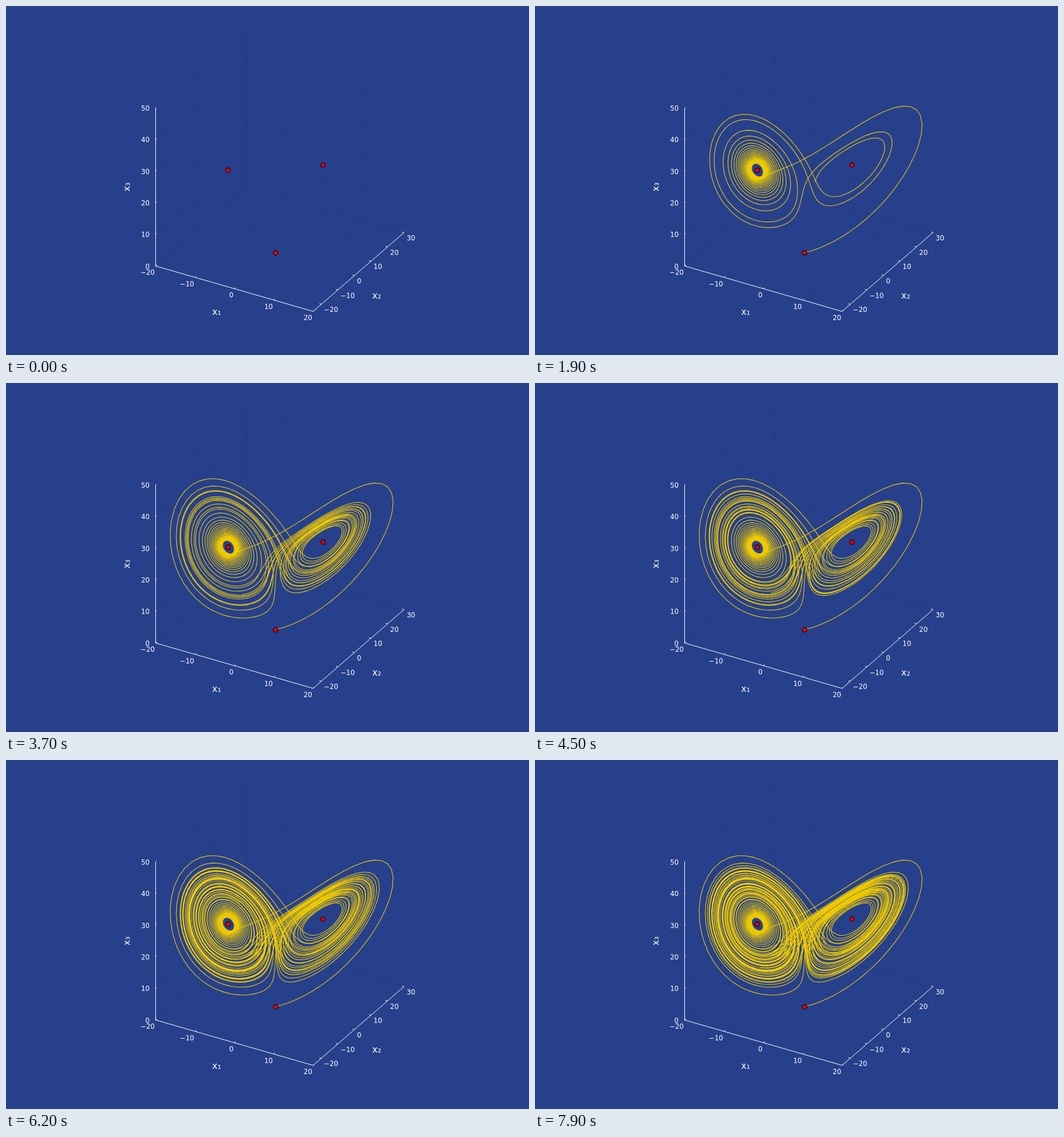
Write an HTML page that moves like this. It is 900 px wide and 600 px high and loops after 8 s.

```html
<!DOCTYPE html>
<html lang="en">
<head>
<meta charset="utf-8">
<title>Lorenz system</title>
<style>
html, body { margin: 0; width: 100%; height: 100%; overflow: hidden; background: #27408b; }
svg { display: block; width: 900px; height: 600px; font-family: "DejaVu Sans", sans-serif; }
text { fill: #fff; font-size: 11.6px; }
.name { font-size: 15.4px; text-anchor: middle; }
.grid { stroke: #000; stroke-opacity: .1; stroke-width: .6; fill: none; }
.axis { stroke: #fff; stroke-width: 1; fill: none; }
.orbit { stroke: #eec900; stroke-width: 1.1; fill: none; stroke-linejoin: round; }
.fixed { fill: #f00; stroke: #000; stroke-width: 1.2; }
</style>
</head>
<body>
<svg viewBox="0 0 900 600"></svg>
<script>
const svg = document.querySelector('svg');
const FRAME = 100, FRAMES = 80, DT = 0.01, STEPS = 100;
const X = [-20, 20], Y = [-25, 30], Z = [0, 50];

const project = ([x, y, z]) => [
  464.1 + 6.775 * x + 2.845 * y,
  424.4 + 1.95 * x - 2.464 * y - 5.43 * z
];
const path = pts => 'M' + pts.map(p => project(p).map(v => v.toFixed(2)).join(' ')).join('L');
const range = (a, b) => Array.from({ length: (b - a) / 10 + 1 }, (_, i) => a + 10 * i);

function add(tag, attrs, text) {
  const el = document.createElementNS('http://www.w3.org/2000/svg', tag);
  for (const k in attrs) el.setAttribute(k, attrs[k]);
  if (text) el.textContent = text;
  svg.append(el);
  return el;
}
const line = (cls, ...pts) => add('path', { class: cls, d: path(pts) });
const label = (n, x, y, anchor) =>
  add('text', { x, y: y + 4.2, 'text-anchor': anchor }, String(n).replace('-', '\u2212'));

// Grid on the floor and the two rear walls
for (const x of range(-20, 20)) line('grid', [x, Y[0], 0], [x, Y[1], 0], [x, Y[1], 50]);
for (const y of range(-20, 30)) line('grid', [20, y, 0], [-20, y, 0], [-20, y, 50]);
for (const z of range(0, 50)) line('grid', [-20, Y[0], z], [-20, Y[1], z], [20, Y[1], z]);

// Axes, ticks and numbers
line('axis', [-20, -25, 50], [-20, -25, 0], [20, -25, 0], [20, 30, 0]);
for (const x of range(-20, 20)) {
  line('axis', [x, -25, 0], [x, -24.2, 0]);
  const [px, py] = project([x, -25, 0]);
  label(x, px - 1.5, py + 11, 'end');
}
for (const y of range(-20, 30)) {
  line('axis', [20, y, 0], [19.5, y, 0]);
  const [px, py] = project([20, y, 0]);
  label(y, px + 4.5, py + 9.3, 'start');
}
for (const z of range(0, 50)) {
  line('axis', [-20, -25, z], [-20, -24.4, z]);
  const [px, py] = project([-20, -25, z]);
  label(z, px - 10.3, py + .4, 'end');
}
add('text', { class: 'name', x: 362.5, y: 531 }, 'x₁');
add('text', { class: 'name', x: 638, y: 502.5 }, 'x₂');
add('text', { class: 'name', transform: 'translate(213 311) rotate(-90)' }, 'x₃');

// Lorenz equations, fourth-order Runge-Kutta
const flow = ([x, y, z]) => [10 * (y - x), x * (28 - z) - y, x * y - 8 / 3 * z];
const move = (u, k, h) => u.map((v, i) => v + h * k[i]);
function step(u) {
  const a = flow(u), b = flow(move(u, a, DT / 2)), c = flow(move(u, b, DT / 2)), d = flow(move(u, c, DT));
  return u.map((v, i) => v + DT / 6 * (a[i] + 2 * b[i] + 2 * c[i] + d[i]));
}
const states = [[0, 1, 0]];
while (states.length <= STEPS * FRAMES) states.push(step(states[states.length - 1]));

const orbit = add('path', { class: 'orbit' });
const c = Math.sqrt(72);
for (const p of [[0, 0, 0], [c, c, 27], [-c, -c, 27]]) {
  const [cx, cy] = project(p);
  add('circle', { class: 'fixed', cx, cy, r: 3.8 });
}

let shown = -1;
function draw() {
  const n = Math.floor(performance.now() / FRAME) % FRAMES;
  if (n !== shown) {
    shown = n;
    orbit.setAttribute('d', path(states.slice(0, n * STEPS + 2)));
  }
  requestAnimationFrame(draw);
}
draw();
</script>
</body>
</html>
```
